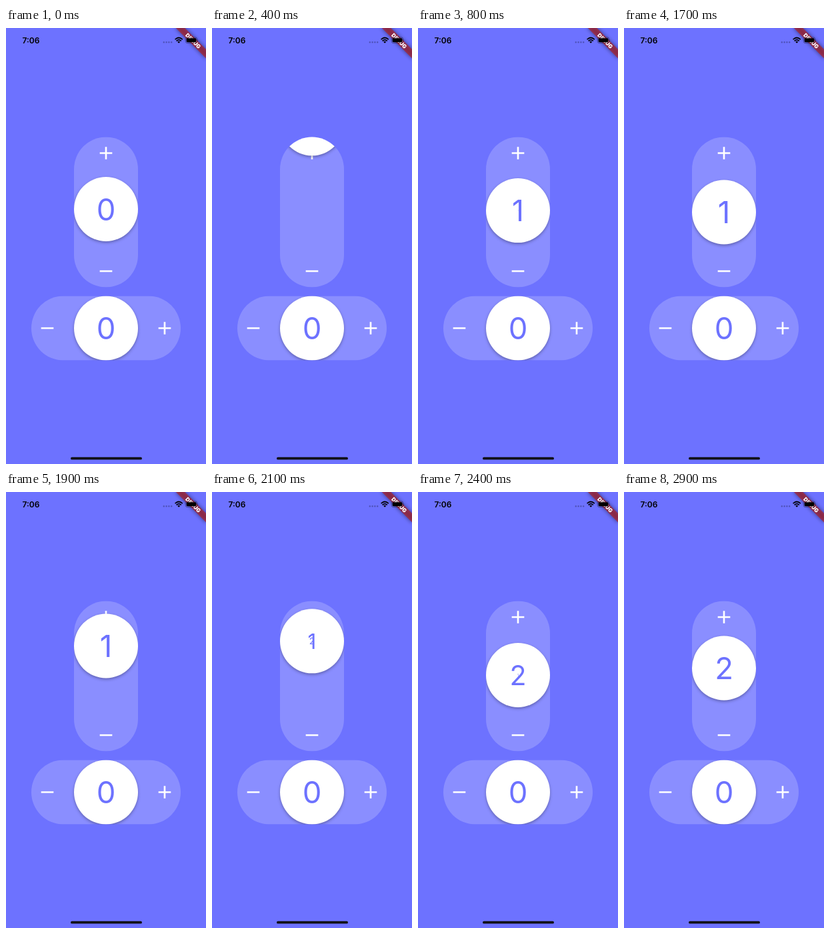
An HTML page for the animation above (3000 ms loop, 300 by 650 pixels).

```html
<!DOCTYPE html>
<html lang="en">
<head>
<meta charset="utf-8">
<title>Stepper</title>
<style>
  html, body { margin: 0; width: 100%; height: 100%; overflow: hidden; background: #6d72ff; }
  svg { display: block; width: 100vw; height: 100vh; }
  text { font-family: Inter, Roboto, sans-serif; }
  .ball circle { fill: #fff; filter: drop-shadow(0 2px 2px rgba(0, 0, 0, .3)); }
  .ball text { font-size: 45.5px; fill: #6d72ff; text-anchor: middle; }
  .track { fill: #fff; fill-opacity: .2; }
  .icon { stroke: #fff; stroke-width: 2.67; }
  .clock { font-size: 12px; font-weight: 600; }
  .debug { font-size: 8.2px; font-weight: 900; fill: #fff; text-anchor: middle; }
</style>
</head>
<body>
<svg viewBox="0 0 300 650">
  <defs>
    <clipPath id="tallClip"><rect x="102" y="162.5" width="96" height="224" rx="48"/></clipPath>
    <clipPath id="wideClip"><rect x="38" y="399.5" width="224" height="96" rx="48"/></clipPath>
    <filter id="blur" x="-30%" y="-150%" width="160%" height="400%"><feGaussianBlur stdDeviation="3.1"/></filter>
    <path id="minus" class="icon" d="M-9.33 0H9.33"/>
    <path id="plus" class="icon" d="M-9.33 0H9.33M0 -9.33V9.33"/>
  </defs>
  <rect width="300" height="650" fill="#6d72ff"/>

  <g clip-path="url(#tallClip)">
    <rect class="track" x="102" y="162.5" width="96" height="224"/>
    <use href="#plus" x="150" y="186.5"/>
    <use href="#minus" x="150" y="362.5"/>
    <g class="ball" id="ball">
      <circle r="48"/>
      <text id="oldDigit" y="16.5"></text>
      <text id="newDigit" y="16.5"></text>
    </g>
  </g>

  <g clip-path="url(#wideClip)">
    <rect class="track" x="38" y="399.5" width="224" height="96"/>
    <use href="#minus" x="62" y="447.5"/>
    <use href="#plus" x="238" y="447.5"/>
    <g class="ball" transform="translate(150 447.5)">
      <circle r="48"/>
      <text y="16.5">0</text>
    </g>
  </g>

  <g transform="translate(300 0) rotate(45)">
    <rect x="-32" y="22.4" width="64" height="9.6" fill-opacity=".5" filter="url(#blur)"/>
    <rect x="-32" y="22.4" width="64" height="9.6" fill="#b71c1c" fill-opacity=".627"/>
    <text class="debug" y="30.2">DEBUG</text>
  </g>

  <text class="clock" x="24.5" y="22.8">7:06</text>
  <path d="M236.8 21.3H249" stroke="#000" stroke-opacity=".28" stroke-width="2.5" stroke-linecap="round" stroke-dasharray="0 3.8"/>
  <g fill="none" stroke="#000" stroke-width="1.7">
    <path d="M253.6 17.1Q259.2 11.9 264.8 17.1M255.6 19.3Q259.2 15.9 262.8 19.3"/>
    <path d="M257.2 20.6Q259.2 19 261.2 20.6L259.2 22.7Z" fill="#000" stroke="none"/>
  </g>
  <rect x="269.4" y="13.9" width="17.2" height="8.7" rx="2.4" fill="none" stroke="#000" stroke-opacity=".4" stroke-width=".8"/>
  <rect x="270.7" y="15.2" width="14.6" height="6.1" rx="1.4"/>
  <path d="M287.5 16.8Q289 18.2 287.5 19.7Z" fill-opacity=".45"/>
  <rect x="97" y="639.8" width="107" height="3.8" rx="1.9" fill="#111118"/>
</svg>
<script>
const LOOP = 3000, STEP = 100;
const REST_Y = 274.5, PULL = 168, BOUNCE_MS = 500;

// Ball offset from rest while the finger holds it
const drag = {
  0: -4.5, 100: -55, 200: -PULL, 300: -PULL,
  1700: 0, 1800: -8, 1900: -45, 2000: -PULL,
  2800: 0, 2900: -12
};
const releases = [{ at: 316, value: 1 }, { at: 1949, value: 2 }];
const holds = [[800, 1700], [2400, 2800]];

const [ball, oldDigit, newDigit] =
  ['ball', 'oldDigit', 'newDigit'].map(id => document.getElementById(id));

function bounceOut(u) {
  const k = 7.5625, d = 2.75;
  if (u < 1 / d) return k * u * u;
  if (u < 2 / d) return k * (u - 1.5 / d) ** 2 + .75;
  if (u < 2.5 / d) return k * (u - 2.25 / d) ** 2 + .9375;
  return k * (u - 2.625 / d) ** 2 + .984375;
}

function setDigit(node, value, scale) {
  node.textContent = scale > 0 ? value : '';
  node.setAttribute('transform', `scale(${scale})`);
}

function draw(time) {
  let t = Math.floor(time / STEP) * STEP;
  const hold = holds.find(([from, to]) => t >= from && t < to);
  if (hold) t = hold[0];

  const release = releases.filter(r => r.at <= t).pop();
  const u = release ? Math.min((t - release.at) / BOUNCE_MS, 1) : 1;
  const value = release ? release.value : 0;
  const offset = t in drag ? drag[t] : -PULL * (1 - bounceOut(u));

  ball.setAttribute('transform', `translate(150 ${REST_Y + offset})`);
  setDigit(oldDigit, value - 1, 1 - u);
  setDigit(newDigit, value, u);
}

const start = performance.now();
function tick() {
  draw((performance.now() - start) % LOOP);
  requestAnimationFrame(tick);
}
tick();
</script>
</body>
</html>
```
